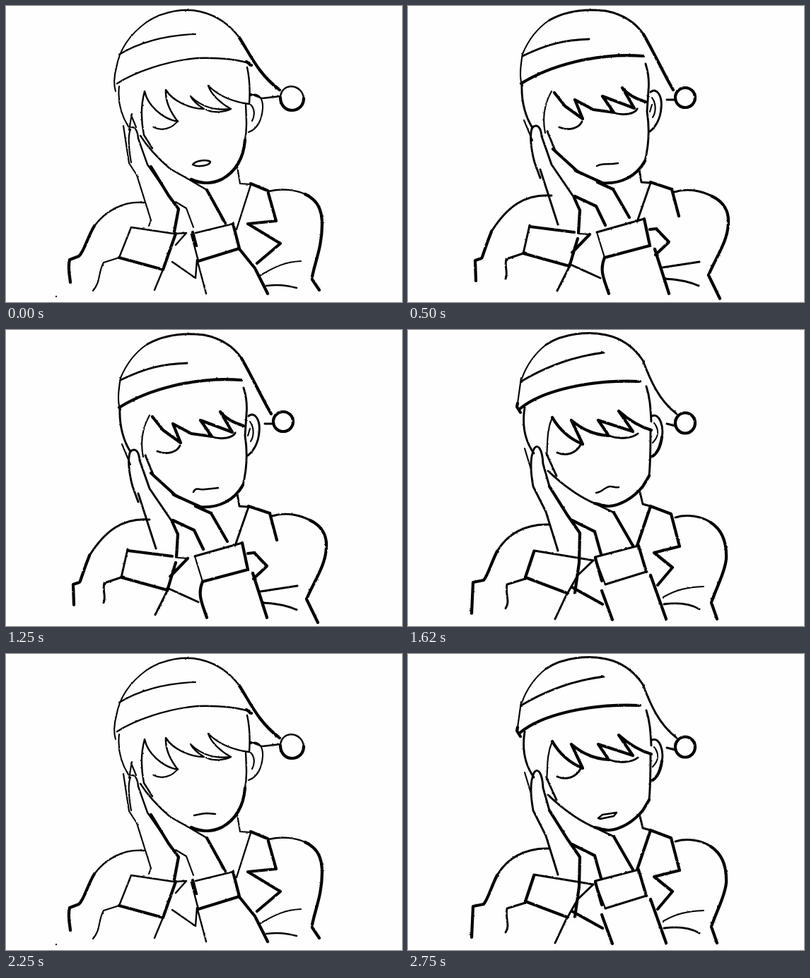
An HTML page for the animation above (2870 ms loop, 560 by 420 pixels).

```html
<!DOCTYPE html>
<html lang="en">
<head>
<meta charset="utf-8">
<title>Sleepy head</title>
<style>
html, body { margin: 0; width: 100%; height: 100%; overflow: hidden; background: #fefefe; }
svg { display: block; width: 100vw; height: 100vh; }
path { fill: none; stroke: #000; stroke-linecap: round; stroke-linejoin: round; }
.fine { stroke-width: 2.1; }
.pen { stroke-width: 2.9; }
.bold { stroke-width: 4.2; }
.A .pen { stroke-width: 2.4; }
.mouth { stroke-width: 2.5; }
</style>
</head>
<body>
<svg id="stage" viewBox="0 0 560 420" xmlns="http://www.w3.org/2000/svg">
  <filter id="brush" filterUnits="userSpaceOnUse" x="0" y="0" width="560" height="420">
    <feTurbulence type="fractalNoise" baseFrequency="0.3" numOctaves="1" seed="4"/>
    <feDisplacementMap in="SourceGraphic" scale="2.2" xChannelSelector="R" yChannelSelector="G"/>
  </filter>
</svg>
<script>
// Three redrawings of the same pose; each part is split by line weight.
const poses = {
  A: {
    hat: {
      fine: 'M155 121C152 112 153 98 156 88C160 62 175 40 200 22M160 69C185 53 225 41 268 40',
      pen: 'M200 22C225 6 255 3 275 8C300 14 317 27 330 45M157 110C180 95 225 78 270 74C300 73 325 76 340 80M346 125L362 131L388 128M388 129C389 118 397 114 404 114C414 115 420 122 421 131',
      bold: 'M330 45C345 68 357 97 387 119M340 79L347 84M421 131C421 141 414 148 404 148C395 148 388 140 388 130'
    },
    head: {
      fine: 'M160 114C158 132 161 152 173 171M178 153L174 176M177 155L184 172M346 127C356 122 364 131 363 145C362 162 355 175 343 179M346 140C352 146 352 156 348 163M209 172C220 178 235 174 243 163M283 147C295 153 310 150 318 146',
      pen: 'M196 121C190 143 191 163 195 183L207 202M196 121C200 140 220 160 243 164C232 150 225 136 226 119C236 135 260 146 280 146C272 141 264 134 261 128C275 142 295 149 318 146C305 139 290 126 286 113C300 127 320 136 344 139M341 87C345 105 345 125 344 139M339 140C340 160 341 175 338 190',
      bold: 'M338 190C336 215 325 235 305 246C290 253 275 252 262 246'
    },
    hands: {
      fine: 'M166 170L174 223L185 240L205 304L202 312M176 175C172 185 174 205 177 222M240 278L255 287L265 314',
      pen: 'M177 172C182 171 186 176 187 188L200 225L243 287M190 184C200 200 215 216 232 231L262 248L284 261M177 314L237 323M177 314L160 357M268 322L321 309M262 324L272 362',
      bold: 'M205 228L230 269L244 288L238 320M284 261L310 308M160 357L222 374L240 323M321 309L330 344L272 362M264 321L269 340'
    },
    coat: {
      fine: 'M327 228L331 252L346 253M160 357L138 364C130 378 134 392 123 404M360 382C380 370 395 363 417 362M71 412L71 412.3',
      pen: 'M195 279C165 276 140 292 125 312M346 254L326 317M222 374L210 403M371 263C390 258 410 261 423 267M240 323L255 322L240 339M235 363L268 386L270 360M368 397C385 395 395 396 411 400M271 363L283 408',
      bold: 'M125 312C115 328 110 350 103 355L90 360C87 372 90 382 91 392M346 252L370 262L382 305L342 309L388 337L355 365M423 267C440 275 447 288 447 310C447 340 438 360 433 384M433 388L443 403M331 346L352 372L370 408'
    }
  },
  B: {
    hat: {
      fine: 'M162 68C172 44 185 30 200 20M162 113C157 104 159 85 162 68',
      pen: 'M200 20C225 6 255 4 280 7C305 12 322 24 333 40M162 71C195 55 220 48 256 47M366 133L378 133',
      bold: 'M333 40C350 70 362 97 375 119M160 110C200 85 265 66 333 71M378 130A14 14 0 1 1 406 130A14 14 0 1 1 378 130'
    },
    head: {
      fine: 'M203 121C192 140 190 160 194 180M345 130C352 140 350 152 346 158M345 140L342 150',
      pen: 'M161 110C160 135 165 155 176 173M336 82C341 98 341 110 340 120L338 150C342 175 340 200 335 220M343 122C352 115 360 128 358 145C357 160 350 172 342 178M214 172C228 178 242 173 246 164M290 151C305 157 322 152 324 146M197 178L209 207',
      bold: 'M207 123L222 142L247 160L236 133L262 147L291 151L275 128L320 145L303 116C310 125 320 131 336 136M335 220C323 242 300 253 275 251L240 235L205 203'
    },
    hands: {
      fine: 'M164 162L176 191M267 321L278 357',
      pen: 'M176 172C172 180 173 200 179 222L187 244M187 232L212 310M176 172C183 167 188 172 189 185L203 225L235 272M172 311L163 351M267 321L334 302',
      bold: 'M235 272L243 290L241 322M268 250L290 260L313 300M240 235L236 233M236 270L266 284L279 311M172 313L235 321M163 351L228 369M334 302L342 340L278 357'
    },
    coat: {
      fine: 'M242 323L257 324',
      pen: 'M166 350L139 359C136 370 142 378 138 387M327 232L330 250L343 251L324 306M203 269C165 266 140 285 118 320M376 264C395 258 415 262 430 270M360 371L412 363M362 387C385 388 400 392 411 397M228 366L272 386M228 370L211 404',
      bold: 'M118 320C108 345 105 358 104 358L95 361L96 390M343 250L373 260L383 298M342 317L351 316L369 335L350 353M430 270C447 278 454 292 453 308C452 335 436 355 425 382L441 415M257 324L232 350M240 330L228 370M278 357C270 375 278 390 284 408M349 345L369 408'
    }
  },
  C: {
    hat: {
      fine: 'M161 69C168 49 180 33 195 21M160 68L155 104',
      pen: 'M195 21C220 4 255 2 280 7C303 12 320 25 332 43C343 72 355 100 380 119M160 73C190 55 230 38 277 32M366 133L378 136',
      bold: 'M155 104L154 109L159 117M158 112C190 85 260 70 328 73M378 132A14 14.5 0 1 1 406 132A14 14.5 0 1 1 378 132'
    },
    head: {
      fine: 'M204 124C195 145 198 165 196 178M348 132C356 142 354 152 346 160',
      pen: 'M165 110C161 135 166 158 178 175M337 80C342 95 343 110 344 130M345 122C356 117 362 138 359 152M211 174C225 180 238 174 244 163M284 150C300 156 318 153 325 147M343 142C343 165 343 185 341 207M264 246C240 236 215 216 198 200M196 176L210 207',
      bold: 'M204 124C215 143 230 155 247 162L231 128C245 140 262 149 284 150L269 128L318 144L298 115C315 130 330 138 344 142M359 152C357 166 352 175 346 179M341 207L332 222C318 239 300 249 284 250C276 250 270 247 264 246'
    },
    hands: {
      fine: 'M165 168L174 198M264 322L279 361',
      pen: 'M178 169C173 180 173 200 177 222L195 258L212 313M178 169C183 160 190 168 191 190L200 222M264 246L291 259M178 313L262 327M178 313L166 350M265 322L326 306M337 343L279 361',
      bold: 'M200 222L225 262L243 288L242 330L236 373M291 259L318 306M232 270L264 286L273 318M178 315L166 351L224 373M326 306L337 343M265 324L274 356'
    },
    coat: {
      fine: 'M361 379C380 368 395 365 418 364',
      pen: 'M169 352L140 361C137 375 145 385 138 395M328 230L332 247L343 250M199 276C165 275 140 290 126 314M378 266C395 261 415 264 428 273M262 327L240 348L222 380L208 410M362 389C385 386 400 389 412 396',
      bold: 'M343 250L324 306M126 314C117 332 113 348 107 355L92 358L90 402M343 250L372 261L384 307L348 316L374 337L353 362M428 273C445 284 451 302 450 325C448 345 436 365 429 387L437 410M232 365L275 389M274 370L289 411M343 348L365 410'
    }
  }
};

const mouths = {
  open: 'M264 225C270 218 285 218 289 221C288 227 270 229 264 225Z',
  yawn: 'M269 233L275 228L295 225L291 230L272 234Z',
  calm: 'M267 227C275 222 282 226 297 223',
  slant: 'M267 231C275 227 285 225 296 222',
  frown: 'M265 230C267 225 270 225 275 226C283 227 290 225 300 224',
  wave: 'M266 231C275 230 279 222 286 222C290 222 295 224 298 223',
  flat: 'M266 229C275 227 280 226 284 226L296 227'
};

const LOOP = 2870;
const TICK = 125;
const poseAtTick = 'AACABCABCABCACBACCACBAC';
const mouthFrom = [[0, 'open'], [3, 'calm'], [6, 'slant'], [9, 'frown'], [12, 'wave'], [16, 'flat'], [20, 'yawn']];

const stage = document.getElementById('stage');

function add(tag, attrs, parent) {
  const node = document.createElementNS(stage.namespaceURI, tag);
  for (const key in attrs) node.setAttribute(key, attrs[key]);
  return parent.appendChild(node);
}

const layers = {};
for (const name in poses) {
  layers[name] = add('g', { class: name, filter: 'url(#brush)' }, stage);
  for (const part of Object.values(poses[name]))
    for (const weight in part) add('path', { class: weight, d: part[weight] }, layers[name]);
}
const mouth = add('path', { class: 'mouth' }, stage);

// Ticks fall on whole hundredths of a second: 0, 120, 250, 370, ...
const tickStart = n => Math.floor(n * TICK / 10) * 10;

function draw(time) {
  const t = time % LOOP;
  let tick = Math.floor(t / TICK);
  if (t >= tickStart(tick + 1)) tick++;
  tick = Math.min(tick, poseAtTick.length - 1);
  for (const name in layers)
    layers[name].style.display = name === poseAtTick[tick] ? '' : 'none';
  const [, shape] = mouthFrom.filter(([from]) => from <= tick).pop();
  mouth.setAttribute('d', mouths[shape]);
}

const began = performance.now();
function loop() {
  draw(performance.now() - began);
  requestAnimationFrame(loop);
}
loop();
</script>
</body>
</html>
```
